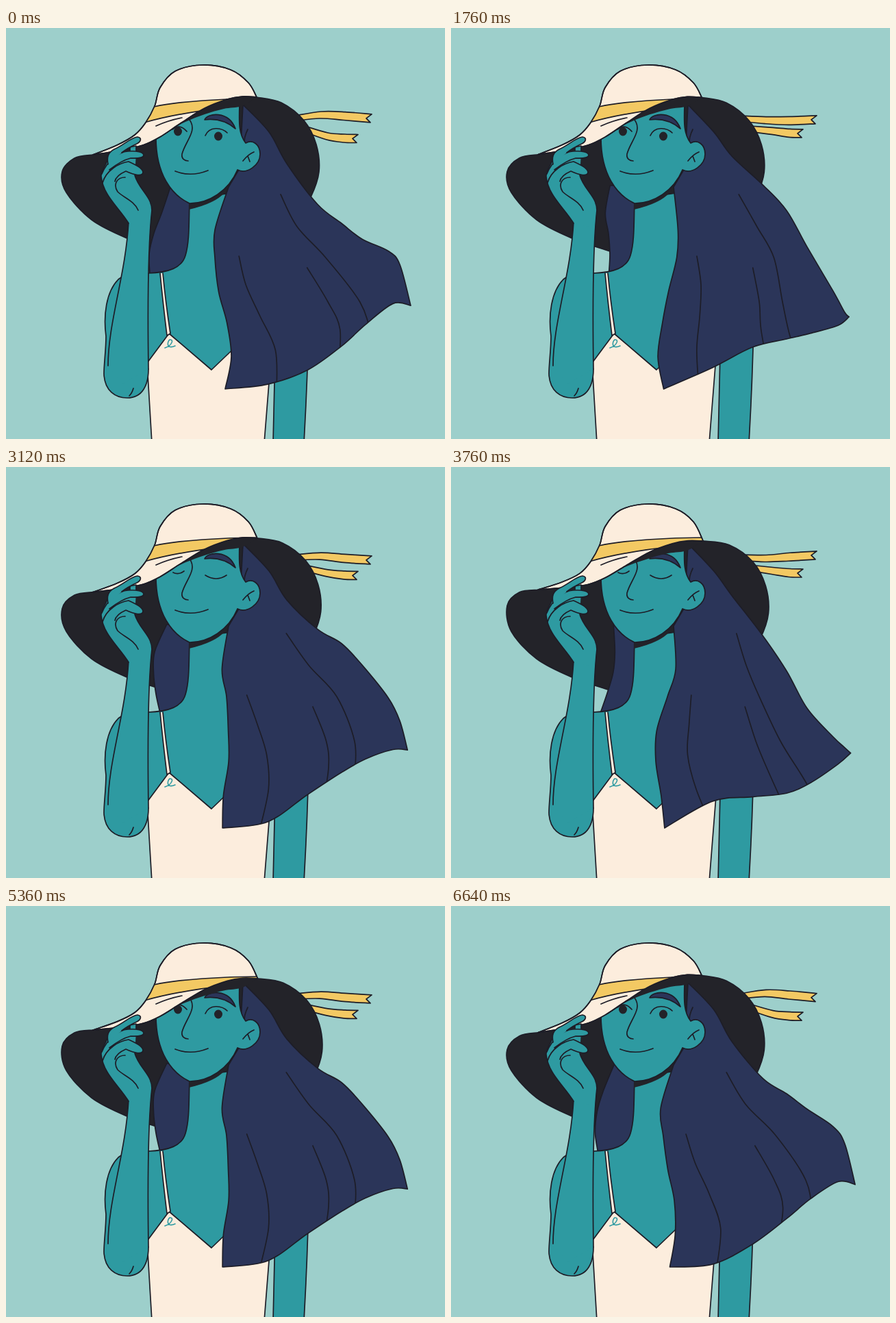
An HTML page that plays this animation: 641x600 px, repeating every 6720 ms.

```html
<!DOCTYPE html>
<html lang="en">
<head>
<meta charset="utf-8">
<title>Woman in a sun hat</title>
<style>
  html, body { margin: 0; width: 100%; height: 100%; overflow: hidden; background: #9dcfcb; }
  svg { display: block; width: 100%; height: 100%; }
  path { fill: none; stroke: #1d1d27; stroke-width: 1.7; stroke-linecap: round; stroke-linejoin: round; }
  .skin { fill: #2e9aa1; }
  .hair { fill: #2b3559; }
  .cream { fill: #fceddd; }
  .gold { fill: #f3c963; }
  .dark { fill: #232329; }
  .bare { stroke: none; }
  .stitch { stroke: #2e9aa1; stroke-width: 1.6; }
</style>
</head>
<body>
<svg viewBox="0 0 641 600">
  <defs>
    <clipPath id="inHat"><path id="hatMask"/></clipPath>
    <clipPath id="inHair"><path id="hairMask"/></clipPath>
  </defs>

  <path id="ribbonHigh" class="gold"/>
  <path id="ribbonLow" class="gold"/>
  <path id="brim" class="dark"/>
  <path id="lock" class="hair"/>

  <g id="body">
    <path class="skin" d="M394 430H442Q440 520 435 606H390Z"/>
    <path class="skin" d="M335 240L268 250C267 285 268 312 262 332C257 350 238 357 207 358V500H385V380Z"/>
    <path class="cream" d="M206 489L238 446L300 499L345 456L387 480L377 606H213Q209 540 206 489Z"/>
    <path class="cream" d="M225 358Q229 400 235 449L240 446Q233 400 229 358"/>
    <path class="stitch" d="M232 467C242 464 246 454 239 455C235 458 234 470 247 464"/>
    <path class="dark bare" d="M267 254Q305 250 326 230Q316 254 267 265Z"/>
  </g>

  <path id="hair" class="hair"/>
  <g clip-path="url(#inHair)"><path id="strands"/></g>

  <g id="face">
    <path d="M353 148Q347 160 348 170"/>
    <path class="skin" d="M341 112C340 140 340 155 350 168C360 162 371 170 371 184C371 200 352 214 338 207C325 238 296 256 268 256C242 244 219 214 219 160L240 120Z"/>
    <path d="M362 181Q354 184 346 194M353 187L356 195"/>
    <path d="M268 134C280 150 262 165 257 184C256 191 261 194 266 194"/>
    <path d="M247 209Q270 218 295 208"/>
    <path class="hair" d="M290 134C294 124 325 120 335 147C322 136 306 132 290 134Z"/>
    <g id="open">
      <path d="M291 157C297 143 315 145 323 153M243 148Q254 139 264 151"/>
      <path class="dark bare" d="M304 158a6 6.5 0 1 0 12 0a6 6.5 0 1 0 -12 0ZM245 151a6 6.5 0 1 0 12 0a6 6.5 0 1 0 -12 0Z"/>
    </g>
    <g id="half">
      <path d="M291 155Q307 154 322 158M244 152Q254 149 264 151"/>
      <path class="dark bare" d="M304 156H317Q317 165 310 165T304 156ZM245 152H258Q257 159 251 159T245 152Z"/>
    </g>
    <path id="shut" d="M291 158Q307 168 322 158M244 154Q252 158 260 152"/>
  </g>

  <path id="shade" class="dark bare"/>
  <path id="hat" class="cream"/>
  <g clip-path="url(#inHat)">
    <path class="gold" d="M216 115C250 107 320 103 370 103L372 112C320 115 250 124 202 138Z"/>
  </g>
  <path d="M219 143Q237 135 257 131"/>
  <path id="hatLine"/>

  <g id="arm">
    <path class="skin" d="M207 361C190 356 172 360 164 367C146 385 142 420 146 450C146 470 143 490 143 505C144 530 160 540 177 540C200 540 208 520 208 498"/>
    <path class="skin bare" d="M179 282C175 360 149 430 149 493L170 520L208 498C207 430 206 330 213 262Z"/>
    <path d="M179 282C175 360 149 430 149 493M186 526Q184 533 180 537"/>
    <path class="skin" d="M181 174L190 172V184H181Z"/>
    <path class="skin bare" d="M152 181C148 200 138 208 139 217C142 245 165 262 179 285L209 292L213 262C212 246 194 236 188 215L190 183Z"/>
    <path d="M152 181C148 200 138 208 139 217C142 245 165 262 179 285"/>
    <path d="M188 215C194 236 213 246 213 266C206 330 207 430 208 498"/>
    <path class="skin" d="M141 226C146 208 165 197 179 195C190 200 200 205 200 211C199 217 188 215 175 209C166 213 160 218 159 224"/>
    <path class="skin" d="M140 213C148 193 165 181 178 180C190 179 201 181 201 186C200 191 190 190 182 190C170 193 160 200 151 207"/>
    <path class="skin" d="M149 199C147 188 149 182 158 177C172 171 182 160 192 159C199 160 197 166 191 169C180 174 174 178 169 182"/>
    <path d="M174 218C162 218 156 228 163 239C172 248 187 252 193 266"/>
  </g>
</svg>
<script>
const STEP = 80, LOOP = 6720, GUST = 1120, BOB = 1680;
const $ = id => document.getElementById(id);
const draw = (d, ...ids) => ids.forEach(id => $(id).setAttribute('d', d));

// Smooth curve through points; separate parts meet in corners.
function curve(points, start) {
  const at = i => points[Math.max(0, Math.min(points.length - 1, i))];
  let d = start + at(0);
  for (let i = 0; i < points.length - 1; i++) {
    const [a, b, c, e] = [at(i - 1), at(i), at(i + 1), at(i + 2)];
    const out = b.map((v, k) => v + (c[k] - a[k]) / 6);
    const into = c.map((v, k) => v - (e[k] - b[k]) / 6);
    d += `C${out} ${into} ${c}`;
  }
  return d;
}
const outline = (...parts) => parts.map((p, i) => curve(p, i ? 'L' : 'M')).join('');
const closed = (...parts) => outline(...parts) + 'Z';

// The gust travels along the hair: each point lags by its place on the curve.
function drawHair(wave) {
  const edge = [[384,152], [410,192], [455,245], [490,281], [520,321], [558,360], [575,383]]
    .map(([x, y]) => [x, y + Math.min(38, (x - 385) * 0.24) * wave((x - 417) * 1.1)]);
  const tip = [586 + 5 * wave(10), 413.5 - 8.5 * wave(10)];
  const hem = [[565,420], [525,443], [490,463], [440,484], [382,505]]
    .map(([x, y]) => [x, y + 18 * wave((x - 412) * 1.1)]);
  const corner = [315 + 5 * wave(0), 527];
  const inner = [[315,480], [313,430], [311,385], [316,335], [319,295]]
    .map(([x, y]) => [x + 14 * wave(y - 477), y]);
  draw(closed([[346,112], ...edge, tip], [tip, ...hem, corner], [corner, ...inner, [325,232]], [[341,205]]),
    'hair', 'hairMask');

  const strand = (foot, points) =>
    outline(points.map(([x, y], i) => [x + Math.min(20, 10 + 4 * i) * wave(y - foot), y]));
  draw(strand(485, [[349,333], [355,375], [363,420], [374,470], [381,530]])
     + strand(420, [[411,243], [434,290], [465,335], [498,400], [515,450], [525,490]])
     + strand(430, [[438,350], [458,400], [470,440], [478,500]]), 'strands');

  const lock = [[237,230], [229,270], [225,300], [221,330], [219,358]]
    .map(([x, y], i) => [x + (i ? 12 : 5) * wave((y - 200) * 1.4), y]);
  draw(closed(lock, [[255,358]], [[275,320]], [[275,230]]), 'lock');
}

function ribbon(id, centre, lag) {
  const line = centre.map(([x, y], i) => [x, y + (i ? 4 : 0) * wave(lag(x)), 4 + Math.min(2, i)]);
  const [tipX, tipY] = line[line.length - 1];
  draw(closed(line.map(([x, y, w]) => [x, y - w]), [[tipX - 8, tipY]],
    line.map(([x, y, w]) => [x - 2, y + w]).reverse()), id);
}
let wave;

// dip: 0 with the hat raised, 1 with it tilted down over the eyes.
function drawHat(dip) {
  const tilt = ([x, y]) => {
    const drop = 17 * Math.sin((x - 195) / 130 * Math.PI / 2);
    return [x + dip * Math.max(0, Math.min(14, (x - 330) / 8)),
            y + dip * (x > 250 ? Math.max(8, drop) : drop)];
  };
  const front = [[127,185], [165,179], [200,171], [225,159], [255,139], [290,117], [323,104], [345,100], [366,101]].map(tilt);
  const back = [[428,272], [445,247], [457,210], [453,170], [435,135], [402,109], [366,101]].map(tilt);
  const side = [...[[127,185], [100,190], [82,210]].map(tilt), [88,240], [125,280], [177,307], [232,326]];
  const under = [[366,101], [344,114], [318,118], [290,126], [262,137], [232,152]].map(tilt);
  const dome = [tilt([366,101]), [354,80], [328,61], [287,54], [247,63], [225,87], [217,114], [204,138],
    ...[[188,156], [162,171], [127,185]].map(tilt)];

  draw(closed(side, back, [...front].reverse()), 'brim');
  draw(closed(front.slice(3), under), 'shade');
  draw(closed(front, dome), 'hat', 'hatLine', 'hatMask');
}

function render(t) {
  wave = lag => Math.cos(2 * Math.PI * t / GUST - lag * Math.PI / 180);
  drawHair(wave);
  ribbon('ribbonHigh', [[422,132], [460,131], [495,131.5], [534,132]], x => 180 + (x - 460) * 1.2);
  ribbon('ribbonLow', [[436,147], [470,154], [495,157], [514,157.5]], () => 0);
  drawHat((1 - Math.cos(2 * Math.PI * t / BOB)) / 2);

  const fromMiddle = Math.abs(t - 3200);
  const lids = fromMiddle > 640 ? 'open' : fromMiddle === 640 ? 'half' : 'shut';
  for (const id of ['open', 'half', 'shut']) $(id).style.display = id === lids ? '' : 'none';
}

const begin = performance.now();
function tick() {
  const t = (performance.now() - begin) % LOOP;
  render(Math.floor(t / STEP) * STEP);
  requestAnimationFrame(tick);
}
tick();
</script>
</body>
</html>
```
